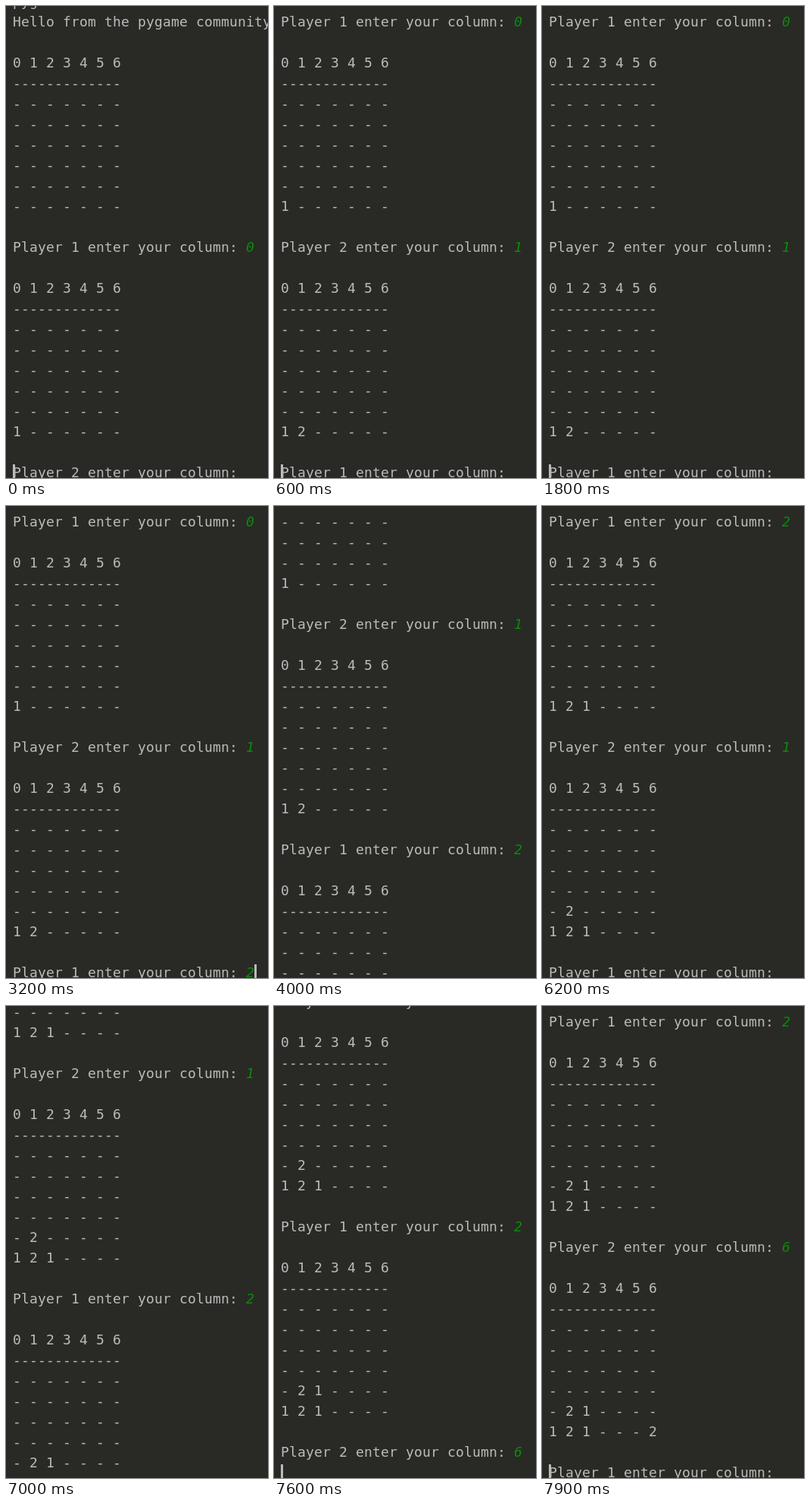
Recreate the animation shown at these times as an HTML page with a canvas. Size 346x622 px, loop 8000 ms.

```html
<!DOCTYPE html>
<html lang="en">
<head>
<meta charset="utf-8">
<title>Connect four in a console</title>
<style>
html, body { margin: 0; width: 100%; height: 100%; overflow: hidden; background: #292a25; }
canvas { display: block; }
</style>
</head>
<body>
<canvas id="stage" width="346" height="622"></canvas>
<script>
const ctx = document.getElementById('stage').getContext('2d');
const W = 346, H = 622, LOOP = 8000, TICK = 100;
const LEFT = 9, CELL = 11, LINE = 27, BOTTOM = 621, ASCENT = 17;
const FONT = '18px "DejaVu Sans Mono", monospace';
const COLORS = { back: '#292a25', text: '#bbbbbb', input: '#098c09' };
const COLS = 7, ROWS = 6, BLOCK = 11;
const FIRST_PROMPT = 12;

// Times in ms; roll holds the share of the new block scrolled in at each tick.
const turns = [
  { column: 0, type: -1, enter: -1, print: -1, roll: [1] },
  { column: 1, type: 100, enter: 200, print: 400, roll: [0.5, 0.9, 1] },
  { column: 2, type: 3200, enter: 3700, print: 4000, roll: [0.5, 0.9, 1], slowEnter: true },
  { column: 1, type: 5000, enter: 5200, print: 5300, roll: [0.4, 0.85, 1] },
  { column: 2, type: 6600, enter: 6700, print: 7000, roll: [0.748, 1] },
  { column: 6, type: 7400, enter: 7600, print: 7800, roll: [0.748, 1] }
];
const caretOff = [[1200, 1800], [2200, 2700], [4700, 5000], [6200, 6600]];

const promptLine = i => FIRST_PROMPT + i * BLOCK;
const prompt = i => `Player ${i % 2 + 1} enter your column: `;

function boardLines(moves) {
  const grid = Array.from({ length: ROWS }, () => Array(COLS).fill('-'));
  moves.forEach((move, i) => {
    const row = grid.findLastIndex(r => r[move.column] === '-');
    grid[row][move.column] = i % 2 + 1;
  });
  const header = [...Array(COLS).keys()].join(' ');
  return ['', header, '-'.repeat(header.length), ...grid.map(r => r.join(' ')), ''];
}

const lines = ['pygame 1.9.6', 'Hello from the pygame community.'];
for (let i = 0; i <= turns.length; i++) {
  lines.push(...boardLines(turns.slice(0, i)), prompt(i));
}

function scrollAt(t) {
  let lineCount = FIRST_PROMPT;
  for (const turn of turns) {
    if (t < turn.enter) break;
    if (t < turn.print) {
      lineCount += turn.slowEnter && t < turn.enter + TICK ? 0.5 : 1;
    } else {
      const step = Math.min(Math.floor((t - turn.print) / TICK), turn.roll.length - 1);
      lineCount += 1 + (BLOCK - 1) * turn.roll[step];
    }
  }
  return Math.round(lineCount * LINE) - BOTTOM;
}

function write(text, column, y, color, style = '') {
  ctx.font = style + FONT;
  ctx.fillStyle = color;
  [...text].forEach((char, i) => ctx.fillText(char, LEFT + (column + i) * CELL, y));
}

function drawCaret(t, printed, scroll) {
  if (caretOff.some(([from, to]) => t >= from && t < to)) return;
  const turn = turns[printed];
  const entered = turn && t >= turn.enter;
  const typed = turn && t >= turn.type && !entered;
  const line = promptLine(printed) + (entered ? 1 : 0);
  const column = typed ? prompt(printed).length + 1 : 0;
  ctx.fillStyle = COLORS.text;
  ctx.fillRect(LEFT + column * CELL, line * LINE - scroll - ASCENT, 3, 22);
}

function draw(t) {
  const scroll = scrollAt(t);
  const printed = turns.filter(turn => t >= turn.print).length;
  ctx.fillStyle = COLORS.back;
  ctx.fillRect(0, 0, W, H);
  for (let i = 0; i <= promptLine(printed); i++) {
    const y = i * LINE - scroll;
    if (y > -LINE && y < H + LINE) write(lines[i], 0, y, COLORS.text);
  }
  turns.forEach((turn, i) => {
    if (t < turn.type) return;
    const y = promptLine(i) * LINE - scroll;
    write(String(turn.column), prompt(i).length, y, COLORS.input, 'italic ');
  });
  drawCaret(t, printed, scroll);
}

const start = performance.now();
function frame() {
  draw((performance.now() - start) % LOOP);
  requestAnimationFrame(frame);
}
frame();
</script>
</body>
</html>
```
